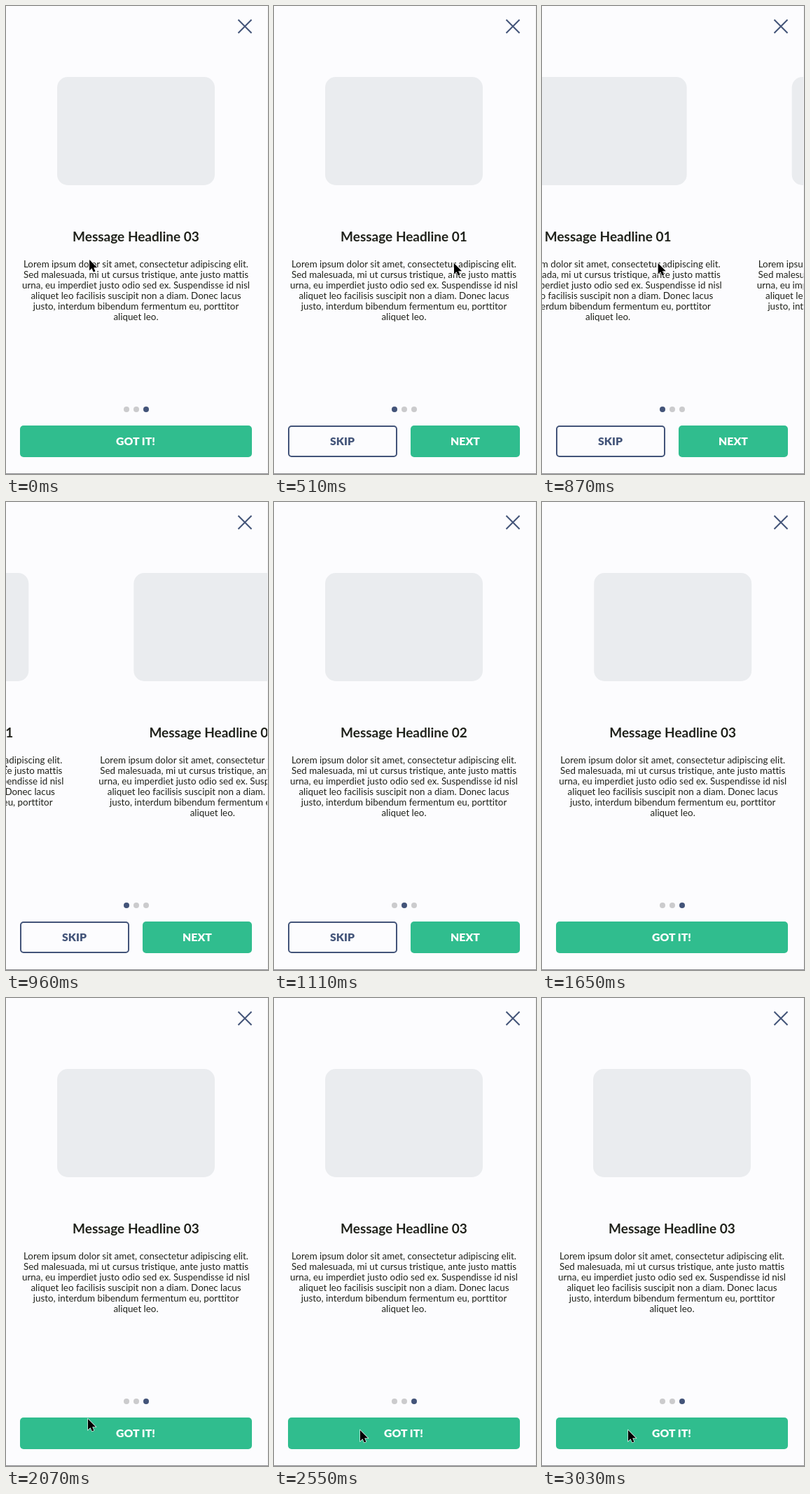
Recreate the animation shown at these times as an HTML page. Size 374 px wide and 666 px high, loop 3060 ms.

```html
<!DOCTYPE html>
<html lang="en">
<head>
<meta charset="utf-8">
<title>Onboarding carousel</title>
<style>
  html, body { margin: 0; width: 100%; height: 100%; overflow: hidden; background: #fcfcfe; }
  svg { display: block; width: 374px; height: 666px; }
  text { font-family: Lato, sans-serif; font-variant-ligatures: none; text-anchor: middle; fill: #20221b; }
  .head { font-size: 19px; font-weight: 700; }
  .body { font-size: 13.4px; }
  .label { font-size: 15.8px; font-weight: 900; fill: #fff; }
  .green { fill: #30bd8e; }
  .line { fill: none; stroke: #435479; stroke-width: 2; }
</style>
</head>
<body>
<svg viewBox="0 0 374 666">
  <g id="slides"></g>
  <path class="line" d="M331.500 19.500l19 19m0-19l-19 19"/>
  <g id="dots"></g>
  <g id="pair">
    <rect class="line" x="21" y="598" width="154" height="43" rx="4"/>
    <text class="label" x="97.500" y="625" style="fill:#435479">SKIP</text>
    <rect class="green" x="195" y="597" width="156" height="45" rx="5"/>
    <text class="label" x="273" y="625">NEXT</text>
  </g>
  <g id="done">
    <rect class="green" x="20" y="597" width="331" height="45" rx="5"/>
    <text class="label" x="185" y="625">GOT IT!</text>
  </g>
  <path d="M373.500 0V666" stroke="#f0f0f3"/>
  <path d="M0 665.500H374" stroke="#8c8c91"/>
  <path id="cursor" d="M0 0V15.500l3.500-3.300 2.300 5.300 2.700-1.100-2.300-5.200h4.900z" stroke="#fff" stroke-width="1.200" paint-order="stroke"/>
</svg>
<script>
const LOOP = 3060, STEP = 30, PITCH = 375, RESET = 180;
const LINES = [
  'Lorem ipsum dolor sit amet, consectetur adipiscing elit.',
  'Sed malesuada, mi ut cursus tristique, ante justo mattis',
  'urna, eu imperdiet justo odio sed ex. Suspendisse id nisl',
  'aliquet leo facilisis suscipit non a diam. Donec lacus',
  'justo, interdum bibendum fermentum eu, porttitor',
  'aliquet leo.'
];

const $ = id => document.getElementById(id);

// Smooth progress from 0 to 1 between two times
function ease(t, start, end) {
  const u = Math.min(1, Math.max(0, (t - start) / (end - start)));
  return u * u * (3 - 2 * u);
}

$('slides').innerHTML = [1, 2, 3].map((page, i) => `<g transform="translate(${i * PITCH})">
  <rect x="73" y="101" width="225" height="154" rx="15" fill="#eaecef"/>
  <text class="head" x="185.5" y="335">Message Headline 0${page}</text>
  ${LINES.map((s, n) => `<text class="body" x="185.5" y="${372 + n * 15}">${s}</text>`).join('')}
</g>`).join('');
$('dots').innerHTML = [172, 186, 200].map(x => `<circle cx="${x}" cy="574" r="4"/>`).join('');

function draw(now) {
  const t = Math.floor(now % LOOP / STEP) * STEP;
  const swipes = t < RESET ? [1, 1] : [ease(t, 780, 1060), ease(t, 1444, 1657)];
  const page = swipes.filter(s => s > 0.75).length;
  const scroll = PITCH * (swipes[0] + swipes[1]);

  // The pointer drags each slide out of view, then glides back in
  const drag = t < RESET ? 0 : scroll;
  const reach = ease(t, 60, 390), back = ease(t, 1110, 1380);
  const toButton = ease(t, 1710, 2070), settle = ease(t, 2070, 2220);
  const x = 119 + 138 * reach + 279 * back + 331 * toButton + 6 * settle - drag;
  const y = 361 + 5 * reach + 233 * toButton + 16 * settle;

  $('slides').setAttribute('transform', `translate(${-scroll})`);
  [...$('dots').children].forEach((d, i) => d.setAttribute('fill', i === page ? '#435479' : '#cbcbcd'));
  $('pair').style.display = page < 2 ? '' : 'none';
  $('done').style.display = page < 2 ? 'none' : '';
  $('cursor').setAttribute('transform', `translate(${x} ${y})`);
}

const start = performance.now();
function tick() {
  draw(performance.now() - start);
  requestAnimationFrame(tick);
}
tick();
</script>
</body>
</html>
```
